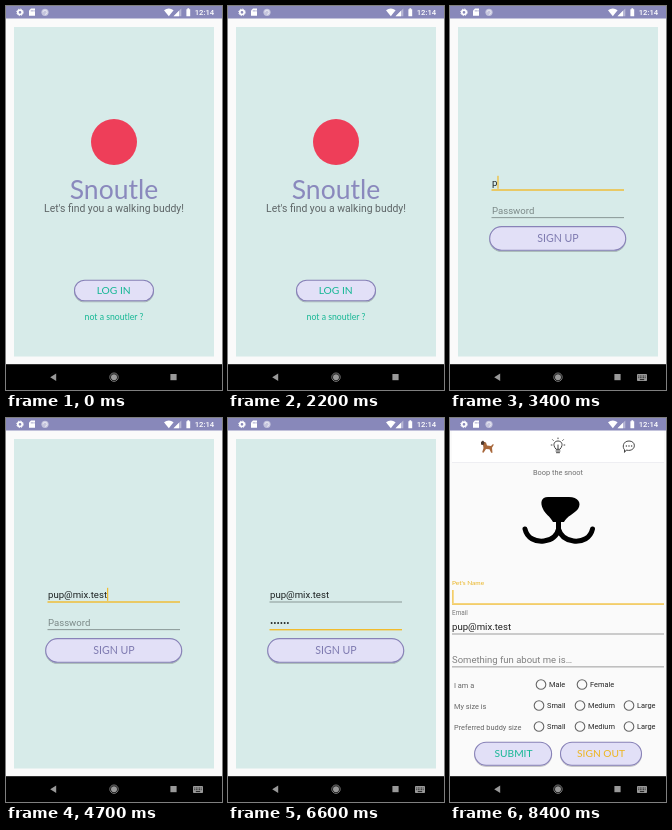
Write an HTML page that moves like this. It is 216 px wide and 384 px high and loops after 8.5 s.

```html
<!DOCTYPE html>
<html lang="en">
<head>
<meta charset="utf-8">
<title>Dog walking app</title>
<style>
html, body { margin: 0; width: 100%; height: 100%; overflow: hidden; background: #fafafa; }
svg { display: block; width: 100%; height: 100%; }
text { font-family: Roboto, sans-serif; white-space: pre; }
.hand { font-family: Lato, sans-serif; }
.mid { text-anchor: middle; }
.btn { fill: #e2e0f7; stroke: #8882b8; stroke-width: 1.1; }
.line { fill: none; stroke: #fff; stroke-width: 1; }
.ink { fill: none; stroke: #444; stroke-width: 1; stroke-linecap: round; stroke-linejoin: round; }
</style>
</head>
<body>
<svg viewBox="0 0 216 384">
  <defs>
    <filter id="soft" x="-20%" y="-20%" width="140%" height="140%"><feGaussianBlur stdDeviation=".7"/></filter>
    <filter id="shade" x="-10%" y="-10%" width="120%" height="140%"><feDropShadow dx="0" dy=".8" stdDeviation=".5" flood-opacity=".3"/></filter>
  </defs>
  <rect width="216" height="384" fill="#fafafa"/>
  <rect x="8" y="21" width="200" height="329.5" fill="#d7ebe9"/>

  <g id="welcome">
    <circle cx="108" cy="136" r="23" fill="#ee3e59"/>
    <text class="hand mid" x="108" y="193" font-size="26.5" fill="#8a89bd">Snoutle</text>
    <text class="mid" x="108" y="206" font-size="10.4" fill="#5f6668">Let's find you a walking buddy!</text>
    <rect class="btn" x="68.5" y="274.2" width="79" height="20.6" rx="10.3" filter="url(#shade)"/>
    <text class="hand mid" x="107.7" y="288" font-size="10.3" fill="#16b795">LOG IN</text>
    <text class="hand mid" x="108" y="314" font-size="8.7" fill="#16b795">not a snoutler ?</text>
  </g>

  <g id="form">
    <text id="mail" x="42" y="180" font-size="9.6"></text>
    <rect id="mailLine" x="41.5" width="132.5"/>
    <text id="pass" x="42" y="208" font-size="9.6"></text>
    <rect id="passLine" x="41.5" width="132.5"/>
    <rect id="caret" width="1.2" height="13" fill="#f1bb2d"/>
    <rect class="btn" x="39.7" y="220.6" width="136" height="23.6" rx="11.8" filter="url(#shade)"/>
    <text class="hand mid" x="108" y="235.6" font-size="10.6" fill="#7e7ab0">SIGN UP</text>
  </g>

  <g id="profile">
    <rect y="12" width="216" height="347" fill="#fafafa"/>
    <rect x="2" y="12" width="212" height="32.5" fill="#fff"/>
    <rect x="2" y="44.3" width="212" height=".7" fill="#e9e9ee"/>
    <g fill="#a8683c">
      <path d="M31 26l2-2.5 3 1 1 3 4 .5 2-2 .8.8-1.8 3 .5 5h-1.4l-1.6-3.5-3.5-.3-2.5 3.8-1.3-.5 1.3-4.3-.5-3z"/>
      <path d="M31 24l2-1.5 1.5 2-1 2.5-2.5-.6z" fill="#4b3a32"/>
    </g>
    <g class="ink" stroke-width=".9">
      <path d="M105.8 31c-4-5-1-8 2.2-8s6.2 3 2.2 8zM106 33h4M106.5 34.7h3M108 31v-4"/>
      <path d="M108 20.7v-.7M103.3 22.4l-.7-.7M112.7 22.4l.7-.7M102 27h-.8M114 27h.8"/>
    </g>
    <path class="ink" d="M176 32.4l-1.5 2v-2.7c-2.3-2.2-1.7-8.7 4.5-8.7 7.2 0 7.2 9.4 0 9.4z"/>
    <g fill="#444"><circle cx="176.4" cy="28" r=".75"/><circle cx="179" cy="28" r=".75"/><circle cx="181.6" cy="28" r=".75"/></g>
    <text class="mid" x="108" y="56.5" font-size="7.4" fill="#707070">Boop the snoot</text>
    <g filter="url(#soft)">
      <path d="M98 79h21c9 0 13 6 9 12-4 5-11 7-14 13h-11c-3-6-8-8-10-13-3-6-2-12 5-12z"/>
      <path d="M108.5 100v13M75 111c2 9 10 13 19 12 8-1 13-5 14.5-12 2 7 7 11 15 12 9 1 17-3 19-12" fill="none" stroke="#000" stroke-width="5" stroke-linecap="round"/>
    </g>
    <text class="hand" x="2" y="167" font-size="6.5" fill="#e9b21e">Pet's Name</text>
    <rect x="2" y="185.4" width="212" height="1.3" fill="#f1bb2d"/>
    <rect x="2.3" y="172" width="1.2" height="13" fill="#f1bb2d"/>
    <text x="2" y="197" font-size="6.4" fill="#777">Email</text>
    <text id="account" x="2" y="212" font-size="9.6" fill="#222"></text>
    <rect x="2" y="215.6" width="212" height=".8" fill="#858585"/>
    <text x="2" y="245" font-size="9.5" fill="#808080">Something fun about me is…</text>
    <rect x="2" y="248.5" width="212" height=".8" fill="#858585"/>
    <g id="choices" font-size="7.4"></g>
    <rect class="btn" x="24.6" y="324.2" width="77" height="23" rx="11.5" filter="url(#shade)"/>
    <text class="hand mid" x="63.5" y="339.2" font-size="10.2" fill="#16b795">SUBMIT</text>
    <rect class="btn" x="110.5" y="324.2" width="81" height="23" rx="11.5" filter="url(#shade)"/>
    <text class="hand mid" x="151" y="339.2" font-size="10.2" fill="#edb51f">SIGN OUT</text>
  </g>

  <rect width="216" height="12.5" fill="#8888ba"/>
  <g fill="#fff">
    <circle cx="14" cy="6.3" r="2.2" fill="none" stroke="#fff" stroke-width="1.7"/>
    <circle cx="14" cy="6.3" r="3.3" fill="none" stroke="#fff" stroke-width="1" stroke-dasharray="1.3 1.29"/>
    <path d="M25 2.6h4v7.2h-6v-5.2z"/>
    <path d="M25.3 4v1.6M26.7 4v1.6M28.1 4v1.6" stroke="#8888ba" stroke-width=".6"/>
    <circle cx="39" cy="6.3" r="3.6" opacity=".5"/>
    <path class="line" d="M36.9 6.3a2.1 2.1 0 1 1 2.1 2.1" opacity=".6"/>
    <path d="M158 4.2q4.8-3.4 9.6 0l-4.8 6z"/>
    <path d="M175.3 2.4v7.8h-7.8z" opacity=".4"/>
    <path d="M173 4.7v5.5h-5.5z"/>
    <path d="M180.4 3.2h1v-.9h1.8v.9h1v7.1h-3.8z"/>
    <text x="188.7" y="9.2" font-size="7.7" font-weight="500">12:14</text>
  </g>
  <rect y="358.2" width="216" height="26"/>
  <g fill="#999">
    <path d="M44.2 371.2l6-3.7v7.4z"/>
    <circle cx="108" cy="371.2" r="3"/>
    <circle cx="108" cy="371.2" r="4.2" fill="none" stroke="#999" stroke-width=".8"/>
    <rect x="164.4" y="368" width="6.2" height="6.2"/>
    <g id="keys">
      <rect x="187" y="368" width="10" height="7" rx=".8"/>
      <path d="M188.3 370h7.4M188.3 371.7h7.4" stroke="#000" stroke-width=".8" stroke-dasharray=".9 .7"/>
      <path d="M189.8 373.6h4.4" stroke="#000" stroke-width=".8"/>
    </g>
  </g>
</svg>
<script>
const LOOP = 8500;
const ADDRESS = "pup@mix.test";
const DIGITS = "123456";
const el = id => document.getElementById(id);

// [time, value] steps
const MAIL = [[0, 0], [3400, 1], [3800, 3], [3900, 5], [4000, 7], [4200, 8], [4500, 11], [4700, 12]];
const PASS = [[0, 0], [5200, 1], [5300, 2], [5400, 3], [5500, 4], [5600, 5], [5800, 6]];
const FOCUS = [[0, ""], [2800, "mail"], [4900, "pass"]];
const CARET = [[0, 1], [6300, 0], [6800, 1], [7000, 0], [7700, 1]];

const at = (steps, t) => steps.reduce((v, s) => t >= s[0] ? s[1] : v, steps[0][1]);
const ramp = (t, a, b) => Math.min(1, Math.max(0, (t - a) / (b - a)));

function addChoices() {
  const sizes = [[89, "Small"], [130, "Medium"], [179, "Large"]];
  const rows = [
    ["I am a", 266.5, [[91, "Male"], [132, "Female"]]],
    ["My size is", 287.5, sizes],
    ["Preferred buddy size", 308.5, sizes]
  ];
  el("choices").innerHTML = rows.map(([label, y, options]) =>
    `<text x="4" y="${y + 3}" fill="#666">${label}</text>` +
    options.map(([x, name]) =>
      `<circle cx="${x}" cy="${y}" r="4.8" fill="none" stroke="#666" stroke-width="1.1"/>` +
      `<text x="${x + 8}" y="${y + 2.7}" fill="#222">${name}</text>`).join("")
  ).join("");
}

function setField(id, value, hint, y, focused) {
  const text = el(id), line = el(id + "Line");
  const shown = value || hint;
  if (text.textContent !== shown) text.textContent = shown;
  text.setAttribute("fill", value ? "#1d2222" : "#7c8988");
  line.setAttribute("y", focused ? y - .7 : y - .4);
  line.setAttribute("height", focused ? 1.4 : .8);
  line.setAttribute("fill", focused ? "#f1bb2d" : "#768281");
  if (focused) {
    const w = value ? text.getComputedTextLength() : 0;
    el("caret").setAttribute("x", 42 + w);
    el("caret").setAttribute("y", y - 14.2);
  }
}

function draw(t) {
  const toForm = ramp(t, 2400, 2600);
  el("welcome").style.opacity = 1 - toForm;
  el("form").style.opacity = toForm;
  el("profile").style.opacity = ramp(t, 8250, 8350);

  const focus = at(FOCUS, t);
  const n = at(PASS, t);
  const code = n && t < 6000 ? "•".repeat(n - 1) + DIGITS[n - 1] : "•".repeat(n);
  setField("mail", ADDRESS.slice(0, at(MAIL, t)), "Email", 184, focus === "mail");
  setField("pass", code, "Password", 211.7, focus === "pass");
  el("caret").style.opacity = focus ? at(CARET, t) : 0;
  el("keys").style.opacity = t >= 2900 ? 1 : 0;
}

addChoices();
el("account").textContent = ADDRESS;
const start = performance.now();
function tick() {
  draw((performance.now() - start) % LOOP);
  requestAnimationFrame(tick);
}
tick();
</script>
</body>
</html>
```
